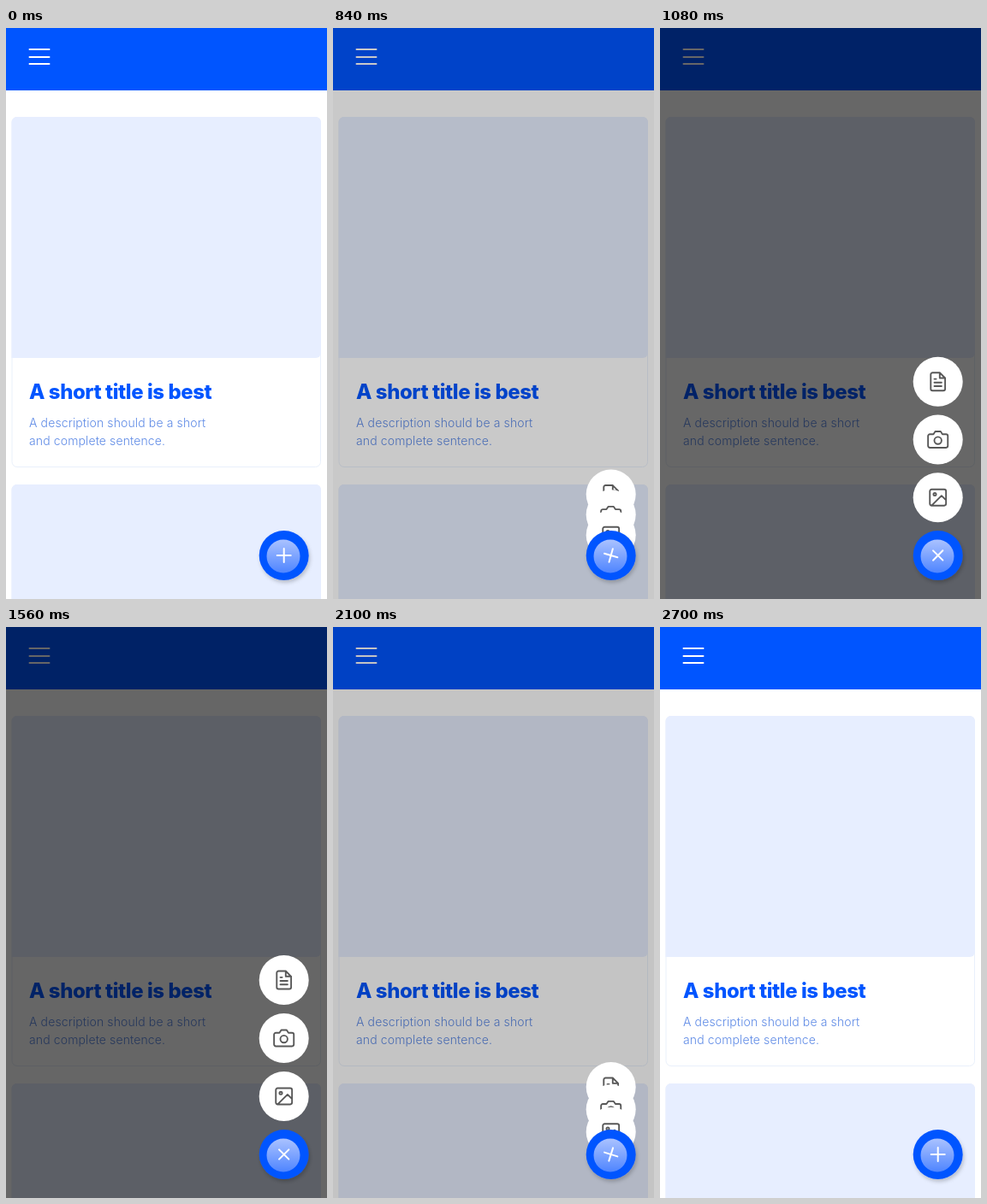
An HTML page for the animation above (2.73 s loop, 375 by 668 pixels).

```html
<!DOCTYPE html>
<html lang="en">
<head>
<meta charset="utf-8">
<title>Floating action menu</title>
<style>
  html, body { margin: 0; width: 100%; height: 100%; overflow: hidden; background: #fff; }
  svg { display: block; width: 375px; height: 668px; }
  text { font-family: Inter, "Open Sans", sans-serif; }
  .title { font-size: 24px; font-weight: 800; letter-spacing: -.45px; fill: #05f; }
  .desc { font-size: 14px; font-weight: 300; letter-spacing: .12px; fill: #5f8be6; }
  .line { fill: none; stroke: #fff; stroke-width: 2; stroke-linecap: round; }
  .icon { fill: none; stroke: #585858; stroke-width: 1.8; stroke-linecap: round; stroke-linejoin: round; }
</style>
</head>
<body>
<svg viewBox="0 0 375 668" xmlns="http://www.w3.org/2000/svg">
  <defs>
    <linearGradient id="gloss" x1="0" y1="0" x2="0" y2="1">
      <stop offset="0" stop-color="#aac2ff"/>
      <stop offset="1" stop-color="#4f85ff"/>
    </linearGradient>
    <filter id="shadow" x="-30%" y="-30%" width="160%" height="160%">
      <feDropShadow dx="1.500" dy="3" stdDeviation="2" flood-color="#000" flood-opacity=".2"/>
    </filter>
    <g id="card">
      <rect x="7" y="104.5" width="360.5" height="409" rx="6" fill="#fff" stroke="#e9f0fb"/>
      <path d="M6.5 386V110a6 6 0 0 1 6-6h349.500a6 6 0 0 1 6 6v270a6 6 0 0 1-6 6z" fill="#e7eeff"/>
    </g>
  </defs>

  <rect width="375" height="668" fill="#fff"/>
  <rect width="375" height="73" fill="#05f"/>
  <path class="line" d="M27.500 25h23M27.500 34h23M27.500 42h23"/>
  <use href="#card"/>
  <text class="title" x="27" y="434">A short title is best</text>
  <text class="desc" x="27" y="467">A description should be a short</text>
  <text class="desc" x="27" y="488">and complete sentence.</text>
  <use href="#card" y="430"/>

  <rect id="shade" width="375" height="668"/>

  <g id="items">
    <g>
      <circle r="29" fill="#fff"/>
      <path class="icon" transform="scale(1.05) translate(-12 -12)"
        d="M14 2H6a2 2 0 0 0-2 2v16a2 2 0 0 0 2 2h12a2 2 0 0 0 2-2V8zV8h6M16 13H8M16 17H8M10 9H8"/>
    </g>
    <g>
      <circle r="29" fill="#fff"/>
      <path class="icon" transform="scale(1.05) translate(-12 -12)"
        d="M23 19a2 2 0 0 1-2 2H3a2 2 0 0 1-2-2V8a2 2 0 0 1 2-2h4l2-3h6l2 3h4a2 2 0 0 1 2 2zM16 13a4 4 0 1 1-8 0a4 4 0 1 1 8 0"/>
    </g>
    <g>
      <circle r="29" fill="#fff"/>
      <path class="icon" transform="scale(1.05) translate(-12 -12)"
        d="M5 3h14a2 2 0 0 1 2 2v14a2 2 0 0 1-2 2H5a2 2 0 0 1-2-2V5a2 2 0 0 1 2-2zM10 8.500a1.500 1.500 0 1 1-3 0a1.500 1.500 0 1 1 3 0M21 15l-5-5L5 21"/>
    </g>
  </g>

  <circle cx="324.700" cy="617" r="29" fill="#05f" filter="url(#shadow)"/>
  <circle cx="324" cy="618" r="19.500" fill="url(#gloss)"/>
  <path id="plus" class="line" d="M-8 0H8M0-8V8"/>
</svg>
<script>
const LOOP = 2730;
const CLOSE = 1924;
const FAB = { x: 324.7, y: 617 };
const GAP = 68;
const $ = id => document.getElementById(id);
const items = [...$('items').children];

// Cubic Bézier easing with y1 = 0 and y2 = 1
function ease(t, x1, x2) {
  if (t <= 0) return 0;
  if (t >= 1) return 1;
  let lo = 0, hi = 1;
  for (let i = 0; i < 24; i++) {
    const s = (lo + hi) / 2, r = 1 - s;
    if (3 * s * r * r * x1 + 3 * s * s * r * x2 + s ** 3 < t) lo = s;
    else hi = s;
  }
  return lo * lo * (3 - 2 * lo);
}

function openness(ms) {
  return ms < CLOSE
    ? ease((ms - 660) / 440, .42, .58)
    : 1 - ease((ms - CLOSE) / 390, .52, .24);
}

function place(el, x, y, turn = 0) {
  el.setAttribute('transform', `translate(${x} ${y}) rotate(${turn})`);
}

function draw(ms) {
  const p = openness(ms);
  $('shade').setAttribute('opacity', .6 * p);
  items.forEach((el, i) => {
    place(el, FAB.x, FAB.y - (items.length - i) * GAP * p);
    el.style.display = p ? '' : 'none';
  });
  place($('plus'), FAB.x, FAB.y, 45 * p);
}

const start = performance.now();
function tick() {
  draw((performance.now() - start) % LOOP);
  requestAnimationFrame(tick);
}
tick();
</script>
</body>
</html>
```
